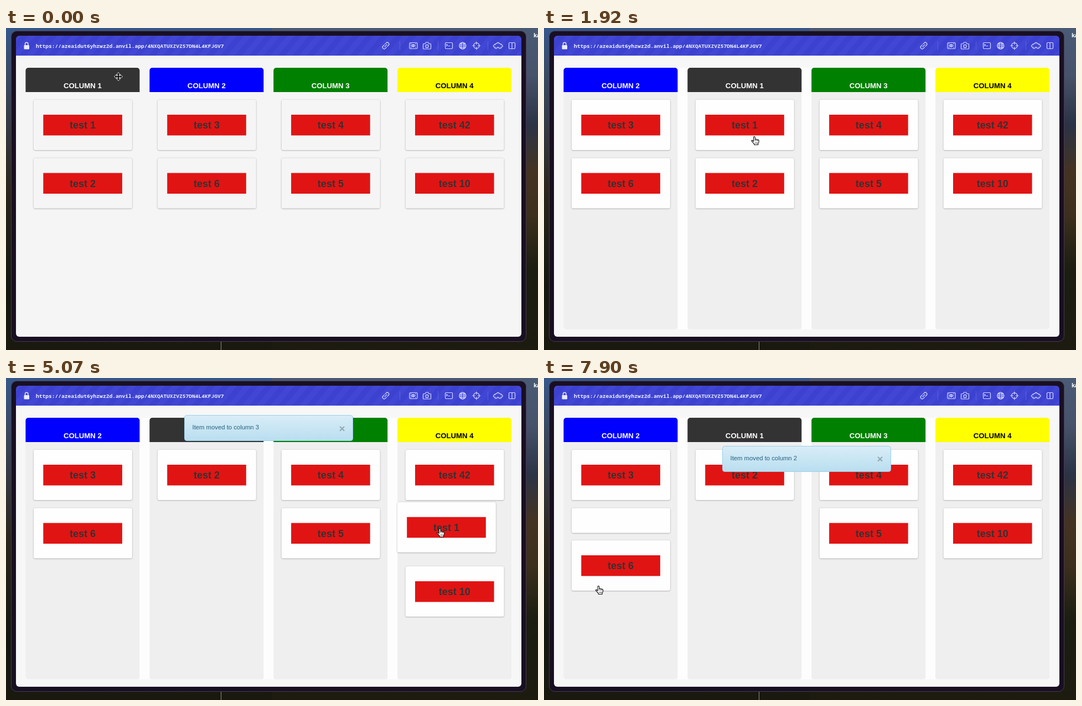
Recreate the animation shown at these times as an HTML page. Size 961 px wide and 583 px high, loop 8000 ms.

```html
<!DOCTYPE html>
<html lang="en">
<head>
<meta charset="utf-8">
<title>Board with draggable columns</title>
<style>
html, body { margin: 0; width: 100%; height: 100%; overflow: hidden; background: #14131a; }
svg { display: block; width: 100%; height: 100%; }
text { font-family: "Liberation Sans", Arial, sans-serif; }
.head { font-size: 13.2px; font-weight: bold; text-anchor: middle; }
.label { font-size: 18px; font-weight: bold; text-anchor: middle; fill: #333; }
.url { font: 600 9.6px "Noto Sans Mono", monospace; fill: #eceefd; }
.paper { filter: drop-shadow(0 0 .8px rgba(0,0,0,.14)) drop-shadow(0 1px 1.2px rgba(0,0,0,.2)); }
.icon { fill: none; stroke: #d6d9f9; stroke-width: 1.2; stroke-linecap: round; stroke-linejoin: round; }
.note { font-size: 11.3px; fill: #28617f; }
.close { font-size: 19px; font-weight: bold; text-anchor: middle; fill: #000; fill-opacity: .27; }
</style>
</head>
<body>
<svg viewBox="0 0 961 583" preserveAspectRatio="none">
  <defs>
    <linearGradient id="west" x2="0" y2="1">
      <stop offset="0" stop-color="#35588c"/>
      <stop offset=".15" stop-color="#3a4a63"/>
      <stop offset=".35" stop-color="#33353a"/>
      <stop offset=".5" stop-color="#2c261c"/>
      <stop offset=".8" stop-color="#14180e"/>
      <stop offset="1" stop-color="#1b190f"/>
    </linearGradient>
    <linearGradient id="east" x2="0" y2="1">
      <stop offset="0" stop-color="#4a5b76"/>
      <stop offset=".15" stop-color="#46526a"/>
      <stop offset=".3" stop-color="#2b3345"/>
      <stop offset=".45" stop-color="#453321"/>
      <stop offset=".58" stop-color="#3d2f1c"/>
      <stop offset=".75" stop-color="#1b1e11"/>
      <stop offset="1" stop-color="#1d1b10"/>
    </linearGradient>
    <linearGradient id="info" x2="0" y2="1">
      <stop offset="0" stop-color="#d9edf7"/>
      <stop offset="1" stop-color="#b9def0"/>
    </linearGradient>
    <pattern id="stripes" width="26" height="40" patternUnits="userSpaceOnUse" patternTransform="skewX(-40)">
      <rect width="26" height="40" fill="#3c42cf"/>
      <rect width="13" height="40" fill="#4147d4"/>
    </pattern>
    <clipPath id="page"><path d="M18 50H931V553a6 6 0 0 1-6 6H24a6 6 0 0 1-6-6Z"/></clipPath>
    <clipPath id="board"><rect x="18" y="72" width="913" height="487"/></clipPath>
  </defs>

  <rect width="481" height="583" fill="url(#west)"/>
  <rect x="480" width="481" height="583" fill="url(#east)"/>
  <path d="M388.500 568V583" stroke="#8d8d8d"/>
  <text x="953" y="17" font-size="11" font-weight="bold" fill="#fff">ka</text>
  <rect x="9.500" y="5.500" width="930" height="562" rx="10" fill="#190f22" stroke="#463b50"/>

  <g clip-path="url(#page)">
    <rect id="back" x="18" y="50" width="913" height="509"/>
    <rect id="gaps" x="35.400" y="72" width="878" height="473.500" fill="#fdfdfd"/>
    <g id="columns" clip-path="url(#board)"></g>
    <g id="loose"></g>
    <g id="toasts"></g>
  </g>

  <path d="M18 50V20a6 6 0 0 1 6-6H925a6 6 0 0 1 6 6V50Z" fill="url(#stripes)"/>
  <g fill="#e9ebfc">
    <rect x="32.500" y="31" width="9.500" height="7.500" rx="1.200"/>
    <path d="M34.500 31V29a2.700 2.700 0 0 1 5.400 0V31" fill="none" stroke="#e9ebfc" stroke-width="1.400"/>
  </g>
  <text class="url" x="54" y="35.500">https://azeaidut6yhzwz2d.anvil.app/4NXQATUXZVZ57DN4L4KFJGV7</text>
  <path d="M711.500 24V40M780.500 24V40M870.500 24V40" stroke="#5b60da"/>
  <g class="icon">
    <g transform="rotate(-45 686 32)">
      <path d="M685 29H682a3 3 0 0 0 0 6H685M687 29H690a3 3 0 0 1 0 6H687M683 32H689"/>
    </g>
    <rect x="729" y="26.500" width="14" height="11" rx="1.500"/>
    <path d="M731.500 32q4-5 8 0q-4 5-8 0Z"/>
    <circle cx="735.500" cy="32" r="1.300"/>
    <path d="M731 28.500h1M739.500 28.500h1M731 35.500h1M739.500 35.500h1"/>
    <path d="M754.500 28.500H757l1.500-2.500h4l1.500 2.500h2.500a1 1 0 0 1 1 1V37a1 1 0 0 1-1 1H754.500a1 1 0 0 1-1-1V29.500a1 1 0 0 1 1-1Z"/>
    <circle cx="760.500" cy="33" r="2.600"/>
    <rect x="793.500" y="26.500" width="13" height="11" rx="1.500"/>
    <path d="M795.500 29.500l2 1.500-2 1.500M799 32.500h2.500"/>
    <circle cx="824.800" cy="32" r="6"/>
    <ellipse cx="824.800" cy="32" rx="2.700" ry="6"/>
    <path d="M819 32H830.800M820 28.800H829.600M820 35.200H829.600"/>
    <circle cx="849.800" cy="32" r="5.200"/>
    <path d="M849.800 25V29.500M849.800 34.500V39M842.800 32H847.300M852.300 32H856.800"/>
    <path d="M883.500 28.500h3a2.200 2.200 0 1 1 4.400 0h3.200v2a2.200 2.200 0 1 1 0 4v2.500h-3.200a2.200 2.200 0 1 0-4.400 0h-3v-2.500a2.200 2.200 0 1 1 0-4Z"/>
    <rect x="908.500" y="26.500" width="11" height="11" rx="1.500"/>
    <path d="M914 26.500V37.500"/>
  </g>
  <g id="pointer">
    <path id="move" d="M0-7L2.800-4H1V-1H4V-2.800L7 0L4 2.800V1H1V4H2.800L0 7L-2.800 4H-1V1H-4V2.800L-7 0L-4-2.800V-1H-1V-4H-2.800Z" fill="#111" stroke="#fff" stroke-width="1.300" paint-order="stroke"/>
    <path id="arrow" d="M-4-7V5.500L-1.200 2.900L.7 7.200L2.700 6.300L.9 2.200H4.700Z" fill="#111" stroke="#fff" stroke-width="1.100"/>
    <g id="hand" stroke="#111" stroke-width="1.100" stroke-linejoin="round">
      <path d="M-3 1.500V-6a1.400 1.400 0 0 1 2.800 0V-2.200q.6-.9 1.700-.6q.8.200 1 .9q1.200-.7 2.100.4q1.800-.5 2 1.300V2.500L5.200 5V7.500H-1.700V6L-6.200 1.200q-.9-1.500.5-1.800q1-.2 2.700 2.100Z" fill="#fff"/>
      <path d="M-.2-2.200V1M2.500-1.800V1M4.600-1.400V1M.2 3V5.500M2 3V5.500M3.800 3V5.500" fill="none" stroke-width=".7"/>
    </g>
  </g>
</svg>

<script>
const LOOP = 8000, STEP = 149;
const TOP = 72, PITCH = 105.5, CARD = 91, BLANK = 45;
const $ = id => document.getElementById(id);
const slot = i => 35.4 + 223.9 * i;

function add(parent, tag, attrs, text) {
  const el = document.createElementNS("http://www.w3.org/2000/svg", tag);
  for (const k in attrs) el.setAttribute(k, attrs[k]);
  if (text) el.textContent = text;
  parent.appendChild(el);
  return el;
}
const place = (el, x, y) => el.setAttribute("transform", `translate(${x} ${y})`);
const show = (el, on) => el.setAttribute("display", on ? "inline" : "none");

// Eased progress from 0 to 1
function glide(t, start, span = 250) {
  const u = Math.min(1, Math.max(0, (t - start) / span));
  return u * u * (3 - 2 * u);
}

// Point after a chain of eased moves
function route(t, [x, y], moves) {
  for (const m of moves) {
    const u = glide(t, m.at, m.span);
    x += (m.x - x) * u;
    y += (m.y - y) * u;
  }
  return [x, y];
}
const go = (at, span, x, y) => ({ at, span, x, y });

function makeCard(parent, label) {
  const g = add(parent, "g");
  const paper = add(g, "rect", { class: "paper", width: 178, height: CARD, rx: 3 });
  const body = add(g, "g");
  add(body, "rect", { x: 17.4, y: 27, width: 142.6, height: 37.5, fill: "#e11414" });
  add(body, "text", { class: "label", x: 88.7, y: 52.3 }, label);
  return { g, paper, body };
}

function makeColumn(n, color, ink, upper, lower) {
  const g = add($("columns"), "g");
  const bed = add(g, "rect", { width: 206, height: 473.5, rx: 4 });
  add(g, "path", { d: "M0 44V5a5 5 0 0 1 5-5H201a5 5 0 0 1 5 5V44Z", fill: color });
  add(g, "text", { class: "head", x: 103, y: 37, fill: ink }, "COLUMN " + n);
  const cards = [upper, lower].map(s => s && makeCard(g, s));
  if (upper) place(cards[0].g, 14.5, 58);
  return { g, bed, cards };
}

function makeToast(n) {
  const g = add($("toasts"), "g");
  add(g, "rect", { x: 322.5, y: .5, width: 304, height: 46, rx: 4, fill: "url(#info)", stroke: "#9acfea" });
  add(g, "text", { class: "note", x: 336.5, y: 26 }, "Item moved to column " + n);
  add(g, "text", { class: "close", x: 607, y: 30.5 }, "×");
  return g;
}

// Later columns lie on top; the first column's upper card moves freely
const cols = {
  c3: makeColumn(3, "#008000", "#fff", "test 4", "test 5"),
  c4: makeColumn(4, "#ffff00", "#000", "test 42", "test 10"),
  c2: makeColumn(2, "#0000ff", "#fff", "test 3", "test 6"),
  c1: makeColumn(1, "#333333", "#fff", "", "test 2")
};
const loose = makeCard($("loose"), "test 1");
const columns = Object.values(cols);
const papers = [loose, ...columns.flatMap(c => c.cards)].filter(Boolean).map(c => c.paper);

const columnMoves = [go(220, 380, 621, 91), go(600, 440, 269.5, 69.5), go(1045, 220, slot(1), TOP)];

const looseMoves = [
  go(2380, 600, 460.5, 223), go(2990, 400, slot(2) + 14.5, 235.5),
  go(4300, 400, 560, 118), go(4700, 450, slot(3) + 14.5, 235.5),
  go(6260, 590, 10, 255), go(6860, 300, slot(0) + 14.5, 235.5)
];

const pointerMoves = [
  go(220, 380, 788, 107), go(600, 440, 448.5, 88.5), go(1045, 280, 381.5, 204),
  go(2380, 600, 568, 296), go(2990, 150, 576, 291),
  go(4300, 400, 638, 173), go(4700, 450, 800, 291),
  go(5250, 400, 788, 305.5), go(5700, 350, 788, 273.5),
  go(6260, 590, 76.5, 293), go(6860, 900, 100, 384)
];

const toasts = [
  { el: makeToast(3), from: 3425, to: 5510, y: () => 67 },
  { el: makeToast(4), from: 5510, to: 7140, y: t => 123 - 56 * glide(t, 5820, 280) },
  { el: makeToast(2), from: 7450, to: LOOP, y: () => 123 }
];

function drawToast({ el, from, to, y }, t) {
  const rest = Math.exp(-(t - from) / 62), out = Math.max(0, (t - to) / 255);
  const on = t > from && out < 1;
  show(el, on);
  if (!on) return;
  place(el, 0, y(t) - 46 * (rest + out));
  el.setAttribute("opacity", (1 - rest * rest) * (1 - out));
}

function drawColumns(t, blank) {
  const gap = blank ? BLANK + 13.5 : PITCH;
  const detour = glide(t, 450, 200) - glide(t, 780);
  const spots = {
    c1: route(t, [slot(0), TOP], columnMoves),
    c2: [slot(1 - glide(t, 300, 300)), TOP],
    c3: [slot(2 - detour), TOP],
    c4: [slot(3), TOP]
  };
  // How far each lower card is pushed by the travelling one
  const lift = glide(t, 2830), cross = glide(t, 4750);
  const push = {
    c1: -PITCH * lift,
    c2: gap * glide(t, 6590),
    c3: PITCH * (lift - cross),
    c4: gap * (cross - glide(t, 6410))
  };
  for (const k in cols) {
    place(cols[k].g, ...spots[k]);
    place(cols[k].cards[1].g, 14.5, 58 + PITCH + push[k]);
  }
  return spots.c1;
}

function draw(time) {
  // The screen refreshes in steps
  const t = Math.floor((time + 18) / STEP) * STEP;
  const fresh = t < 290, blank = t >= 5360;

  $("back").setAttribute("fill", fresh ? "#f5f5f5" : "#f7f7f7");
  show($("gaps"), !fresh);
  columns.forEach(c => c.bed.setAttribute("fill", fresh ? "#f5f5f5" : "#efefef"));
  papers.forEach(p => p.setAttribute("fill", fresh ? "#f5f5f5" : "#fefefe"));

  const [x, y] = drawColumns(t, blank);
  place(loose.g, ...route(t, [x + 14.5, y + 58], looseMoves));
  loose.paper.setAttribute("height", blank ? BLANK : CARD);
  show(loose.body, !blank);

  place($("pointer"), ...route(t, [203, 88], pointerMoves));
  show($("move"), t < 1040);
  show($("arrow"), t >= 1040 && t < 1330);
  show($("hand"), t >= 1330);

  toasts.forEach(n => drawToast(n, t));
}

const start = performance.now();
function tick() {
  draw((performance.now() - start) % LOOP);
  requestAnimationFrame(tick);
}
tick();
</script>
</body>
</html>
```
